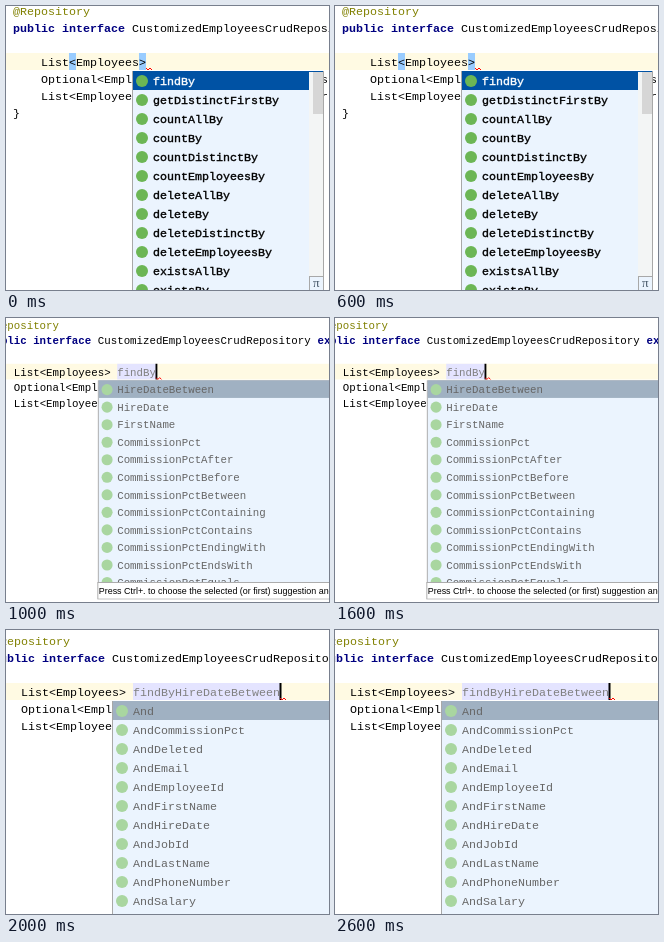
An HTML page that plays this animation: 323x284 px, repeating every 3 s.

```html
<!DOCTYPE html>
<html lang="en">
<head>
<meta charset="utf-8">
<title>Code completion</title>
<style>
  html, body { margin: 0; width: 100%; height: 100%; overflow: hidden; background: #fff; }
  svg { display: block; }
  text { white-space: pre; font: 11.667px "Liberation Mono", monospace; }
  .key { fill: #000080; font-weight: bold; }
  .note { fill: #808000; }
  .unused { fill: #808080; }
  .hint { font: 9.68px "Liberation Sans", sans-serif; }
  .pi { font: 13px "Liberation Serif", serif; }
</style>
</head>
<body>
<svg id="stage" width="323" height="284"></svg>
<script>
const CHAR = 7, LINE = 17, ROW = 19, DURATION = 1000;
const ITEM_X = 20 * CHAR, LIST_X = 119, LIST_Y = 60;

const pct = ['', 'After', 'Before', 'Between', 'Containing', 'Contains', 'EndingWith', 'EndsWith', 'Equals']
  .map(end => 'CommissionPct' + end);

const scenes = [
  {
    x: 7, y: 5, scale: 1, right: 311, bottom: 300, typed: '', focused: true,
    items: ['findBy', 'getDistinctFirstBy',
      ...['count', 'delete'].flatMap(verb => ['AllBy', 'By', 'DistinctBy', 'EmployeesBy'].map(end => verb + end)),
      'existsAllBy', 'existsBy']
  },
  {
    x: -18, y: 7, scale: .923, right: 400, bottom: 279, typed: 'findBy',
    items: ['HireDateBetween', 'HireDate', 'FirstName', ...pct],
    hint: 'Press Ctrl+. to choose the selected (or first) suggestion and insert a dot afterwards'
  },
  {
    x: -13, y: 11, scale: 1, right: 400, bottom: 300, typed: 'findByHireDateBetween',
    items: ['', 'CommissionPct', 'Deleted', 'Email', 'EmployeeId', 'FirstName', 'HireDate',
      'JobId', 'LastName', 'PhoneNumber', 'Salary'].map(end => 'And' + end)
  }
];

const escape = s => s.replace(/</g, '&lt;').replace(/>/g, '&gt;');
const rect = (x, y, w, h, fill, extra = '') =>
  `<rect x="${x}" y="${y}" width="${w}" height="${h}" fill="${fill}" ${extra}/>`;
const text = (x, middle, s, cls = '', fill = '#000', extra = '') =>
  `<text x="${x}" y="${middle + 4}" class="${cls}" fill="${fill}" ${extra}>${escape(s)}</text>`;
const code = (col, line, s, cls) => text(col * CHAR, line * LINE, s, cls);

function editor({ typed, focused }) {
  const end = (typed ? 20 + typed.length : 19) * CHAR;
  const marks = focused
    ? [8, 18].map(col => rect(col * CHAR, 42, CHAR, LINE, '#99ccff')).join('')
    : rect(ITEM_X, 42, end - ITEM_X, LINE, '#e4e4ff') + rect(end - .5, 42, 2, LINE, '#000');
  return rect(-10, 42, 400, LINE, '#fffae3') + marks +
    code(0, 0, '@Repository', 'note') +
    code(0, 1, 'public interface', 'key') +
    code(17, 1, 'CustomizedEmployeesCrudRepository') +
    code(51, 1, 'extends', 'key') +
    code(4, 3, 'List<Employees>') + code(20, 3, typed, 'unused') +
    code(4, 4, 'Optional<Employees>') + code(44, 4, 'st') +
    code(4, 5, 'List<Employees>') + code(44, 5, 'r') +
    code(0, 6, '}') +
    `<path d="M${end} 57l2 2 2-2 2 2" fill="none" stroke="#f00"/>`;
}

function popup({ right, bottom, focused, items, hint }) {
  const width = right - LIST_X;
  const border = 'stroke="#a8a8a8"';
  const rows = items.map((item, i) => {
    const middle = 70 + i * ROW;
    const fill = focused ? (i ? '#000' : '#fff') : '#666';
    const weight = focused ? `stroke="${fill}" stroke-width=".35"` : '';
    return `<circle cx="${ITEM_X - 11}" cy="${middle}" r="6" fill="${focused ? '#6cb655' : '#a9d6a0'}"/>` +
      text(ITEM_X, middle, item, '', fill, weight);
  }).join('');
  const scrollbar = focused
    ? rect(right - 15, 61, 14, 240, '#f3f5f5') + rect(right - 11, 61, 10, 42, '#d6d6d6') +
      rect(right - 14.5, 265.5, 14, 14, '#ebf4fe', border) + text(right - 11, 272, 'π', 'pi', '#456')
    : '';
  const footer = hint
    ? rect(LIST_X, bottom, width, 18, '#fff', border) + text(LIST_X + 1, bottom + 8.5, hint, 'hint') +
      rect(LIST_X - 1, bottom + 18.5, width, 20, '#fff')
    : '';
  return rect(LIST_X + .5, LIST_Y + .5, width - 1, bottom - LIST_Y, '#ebf4fe', border) +
    rect(LIST_X + 1, LIST_Y, width - 2, ROW, focused ? '#0052a4' : '#a0b1c2') +
    rows + scrollbar + footer;
}

const stage = document.getElementById('stage');
stage.innerHTML = scenes.map(s =>
  `<g transform="translate(${s.x} ${s.y}) scale(${s.scale})">${editor(s)}${popup(s)}</g>`).join('');
const groups = [...stage.children];

function draw() {
  const current = Math.floor(performance.now() / DURATION) % scenes.length;
  groups.forEach((g, i) => g.style.display = i === current ? '' : 'none');
  requestAnimationFrame(draw);
}
draw();
</script>
</body>
</html>
```
